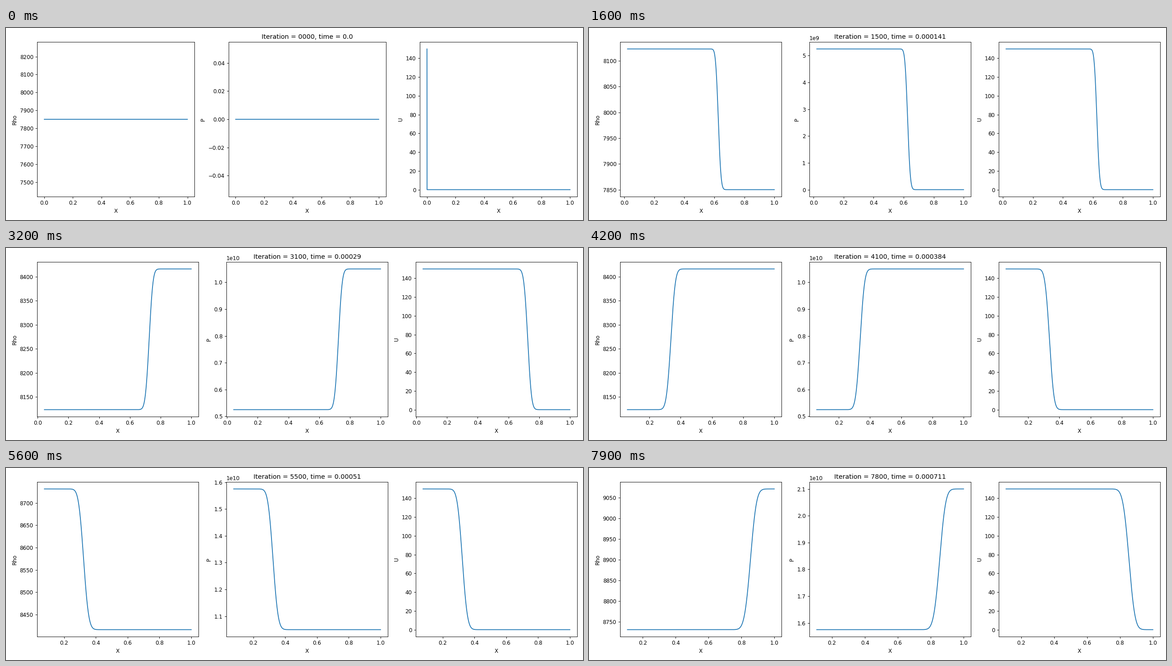
A matplotlib script for the animation above (8 s loop, 1280 by 427 pixels).

```python
import numpy as np
import matplotlib.pyplot as plt
from matplotlib.animation import FuncAnimation

DPI = 256 / 3
WIDTH, HEIGHT = 1280, 427

CELLS = 1343
CFL = 0.6
RHO0 = 7850.0
IMPEDANCE = 3.5e7
SOUND = IMPEDANCE / RHO0
STIFFNESS = RHO0 * SOUND ** 2
PISTON = 150.0

STEPS, STRIDE = 10000, 100
FRAMES, INTERVAL = 80, 100


def simulate():
    """Lagrangian Godunov scheme: a piston drives a shock into a closed bar."""
    nodes = np.linspace(0, 1, CELLS + 1)
    mass = RHO0 / CELLS
    u = np.zeros(CELLS)
    u[0] = PISTON
    p = np.zeros(CELLS)
    u_face = np.zeros(CELLS + 1)
    p_face = np.zeros(CELLS + 1)
    u_face[0] = PISTON
    time = 0.0
    states = {}

    for step in range(STEPS + 1):
        size = np.diff(nodes)
        if step % STRIDE == 0:
            centres = (nodes[1:] + nodes[:-1]) / 2
            rho = RHO0 / (1 - p / STIFFNESS)
            states[step] = time, centres, (rho, p.copy(), u.copy())

        dt = CFL * np.min(size / (SOUND + np.abs(u)))
        u_face[1:-1] = (u[:-1] + u[1:] - (p[1:] - p[:-1]) / IMPEDANCE) / 2
        p_face[1:-1] = (p[:-1] + p[1:] - (u[1:] - u[:-1]) * IMPEDANCE) / 2
        p_face[0] = p[0] + IMPEDANCE * (PISTON - u[0])
        p_face[-1] = p[-1] + IMPEDANCE * u[-1]

        u -= dt / mass * np.diff(p_face)
        nodes += dt * u_face
        p = STIFFNESS * (1 - np.diff(nodes) * CELLS)
        time += dt
    return states


states = simulate()

# Steps play in text order, so 10000 follows 1000.
order = sorted(states, key="{:04d}".format)[:FRAMES]

fig, axes = plt.subplots(1, 3, figsize=(WIDTH / DPI, HEIGHT / DPI), dpi=DPI)
lines = []
for ax, name in zip(axes, ("Rho", "P", "U")):
    lines += ax.plot([], [])
    ax.set_xlabel("X")
    ax.set_ylabel(name)


def draw(i):
    step = order[i]
    time, x, fields = states[step]
    for ax, line, values in zip(axes, lines, fields):
        line.set_data(x, values)
        ax.relim()
        ax.autoscale_view()
    axes[1].set_title(f"Iteration = {step:04d}, time = {round(float(time), 6)}")

    # Start wide, so the title clears the exponent and frames stay independent.
    fig.subplots_adjust(left=0.053, right=0.99, bottom=0.117, top=0.928, wspace=0.17)
    fig.tight_layout()
    return lines


anim = FuncAnimation(fig, draw, frames=FRAMES, interval=INTERVAL, repeat=True)
plt.show()
```
